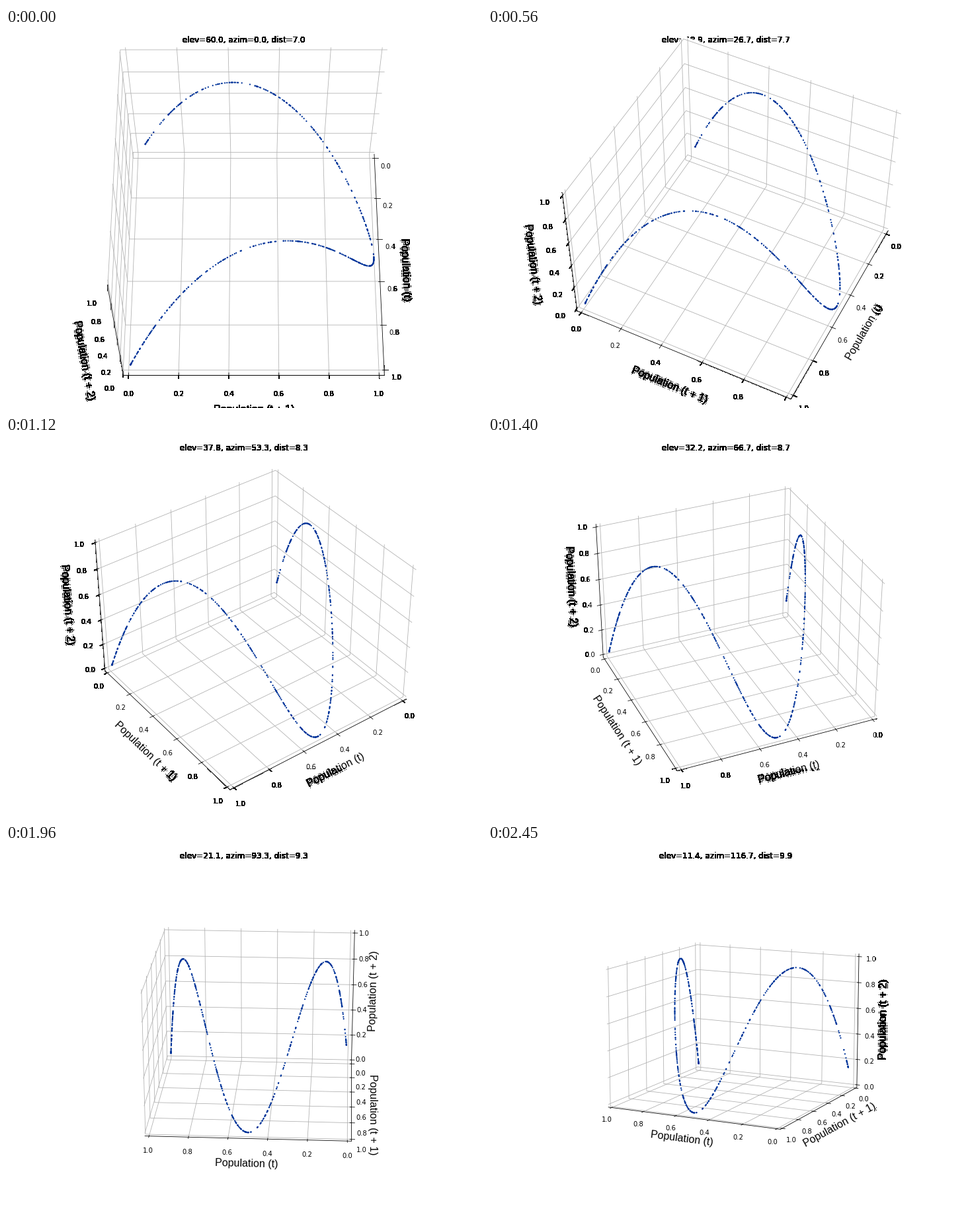
Write a matplotlib script that moves like this. It is 720 px wide and 576 px high and loops after 2520 ms.

```python
import numpy as np
import matplotlib.pyplot as plt
from matplotlib.animation import FuncAnimation
from matplotlib.collections import LineCollection
from matplotlib.patches import Polygon, Rectangle

W, H = 720, 576
FRAMES, INTERVAL = 36, 70

# Square plot area in pixels, and the camera's scale and centre inside it
SIDE, BOTTOM = 434.88, 72
LEFT = 369 - SIDE / 2
SCALE = SIDE / 0.185
CENTRE = np.array([LEFT, BOTTOM]) + 0.095 * SCALE
ASPECT = np.array([4, 4, 3]) * 1.8294640721620434 / np.sqrt(41)

LOW, HIGH = -1 / 48, 1 + 1 / 48
DELTA = 1 / 12
PER_POINT = 48 / (2 * SIDE) * DELTA
TICK_PAD, LABEL_PAD = 11.5 * PER_POINT, 25 * PER_POINT
TICKS = np.linspace(0, 1, 6)
NAMES = ["Population (t)", "Population (t + 1)", "Population (t + 2)"]
SIDEWAYS = [1, 0, 0]  # direction of the ticks on each axis


def logistic_points(count=500, rate=3.99):
    pops = [0.5]
    for _ in range(count - 1):
        pops.append(pops[-1] * rate * (1 - pops[-1]))
    pops = np.array(pops)
    points = np.column_stack([pops[:-2], pops[1:-1], pops[2:]])
    x = points[:, 0]
    gaps = ((x > 0.263) & (x < 0.2705)) | ((x > 0.341) & (x < 0.3515))
    return points[~gaps]


class Camera:
    def __init__(self, elev, azim, dist):
        e, a = np.radians([elev, azim])
        self.dist = dist
        self.toward = np.array([np.cos(e) * np.cos(a), np.cos(e) * np.sin(a), np.sin(e)])
        right = [-np.sin(a), np.cos(a), 0]
        up = [-np.sin(e) * np.cos(a), -np.sin(e) * np.sin(a), np.cos(e)]
        self.screen = np.array([right, up]).T
        high = self.toward < -1e-9
        self.far = np.where(high, HIGH, LOW)
        self.near = np.where(high, LOW, HIGH)

    def project(self, points):
        p = (np.asarray(points) - 0.5) * ASPECT
        depth = self.dist - p @ self.toward
        return CENTRE + SCALE * (p @ self.screen) / depth[..., None]


def replaced(point, index, value):
    point = np.array(point, dtype=float)
    point[index] = value
    return point


def pushed_out(point, index, amount):
    """Move a point away from the cube's centre, except along one axis."""
    step = np.where(point < 0.5, -amount, amount)
    return point + replaced(step, index, 0)


def axis_parts(cam, i):
    """Screen positions of one axis: line, ticks, tick labels, label, grid, pane."""
    j = SIDEWAYS[i]
    start = replaced(cam.far, j, cam.near[j])
    end = replaced(start, i, cam.near[i])
    line = cam.project([start, end])
    sign = 1 if cam.far[j] > 0.5 else -1

    ticks, spots, grid = [], [], []
    for t in TICKS:
        at = replaced(start, i, t)
        ticks.append(cam.project([replaced(at, j, at[j] + 0.1 * sign * DELTA),
                                  replaced(at, j, at[j] - 0.2 * sign * DELTA)]))
        spots.append(cam.project(pushed_out(at, i, TICK_PAD)))
        back = replaced(cam.far, i, t)
        a, b = (i + 1) % 3, (i + 2) % 3
        grid.append(cam.project([replaced(back, a, cam.near[a]), back,
                                 replaced(back, b, cam.near[b])]))

    dx, dy = line[1] - line[0]
    angle = np.degrees(np.arctan2(dy, dx)) % 180
    if angle > 90:
        angle -= 180
    label = cam.project(pushed_out((start + end) / 2, i, LABEL_PAD))

    a, b = (i + 1) % 3, (i + 2) % 3
    corners = [replaced(replaced(cam.far, a, p), b, q)
               for p, q in [(LOW, LOW), (LOW, HIGH), (HIGH, HIGH), (HIGH, LOW)]]
    return line, ticks, spots, label, angle, grid, cam.project(corners)


def harden(img, dpi):
    """Turn every touched pixel solid black."""
    out = np.zeros_like(img)
    out[..., 3] = img[..., 3] > 0
    return out, 0, 0


class Ink:
    """The black lines and texts of the plot on one layer."""

    def __init__(self, ax):
        self.lines = LineCollection([], colors="black", linewidths=0.8,
                                    capstyle="projecting", zorder=3)
        ax.add_collection(self.lines, autolim=False)
        self.numbers = [[ax.text(0, 0, f"{t:.1f}", family="DejaVu Sans", size=10,
                                 ha="center", va="top", zorder=4) for t in TICKS]
                        for _ in NAMES]
        self.labels = [ax.text(0, 0, name, family="Liberation Sans", size=16,
                               ha="center", va="center", zorder=4) for name in NAMES]

    def update(self, parts):
        segments = []
        for i, (line, ticks, spots, label, angle, _, _) in enumerate(parts):
            segments += [line, *ticks]
            for text, spot in zip(self.numbers[i], spots):
                text.set_position(spot)
            self.labels[i].set_position(label)
            self.labels[i].set_rotation(angle)
        self.lines.set_segments(segments)


def layer(fig, zorder):
    ax = fig.add_axes([0, 0, 1, 1], zorder=zorder)
    ax.set_xlim(0, W)
    ax.set_ylim(0, H)
    ax.set_axis_off()
    return ax


fig = plt.figure(figsize=(10, 8), dpi=72, facecolor="white")
back, front = layer(fig, 0), layer(fig, 1)

# Text is hard-edged outside the plot area and smooth on its white ground
back.set_agg_filter(harden)
inks = [Ink(back), Ink(front)]
title = back.text(W / 2, 0.98 * H, "", family="DejaVu Sans", size=12,
                  ha="center", va="top")

front.add_patch(Rectangle((LEFT, BOTTOM), SIDE, SIDE, fc="white", ec="none", zorder=0))
panes = [front.add_patch(Polygon([(0, 0), (1, 0), (1, 1)], fc="white", ec="white",
                                 lw=1, zorder=1)) for _ in NAMES]
grid = LineCollection([], colors="#b0b0b0", linewidths=0.8, zorder=2)
front.add_collection(grid, autolim=False)
points = logistic_points()
dots = front.scatter(points[:, 0], points[:, 1], s=5, c="#003399",
                     edgecolors="none", zorder=5)


def draw(frame):
    turn = frame / FRAMES
    elev, azim, dist = 60 - 50 * turn, 120 * turn, 7 + 3 * turn
    cam = Camera(elev, azim, dist)
    parts = [axis_parts(cam, i) for i in range(3)]
    for ink in inks:
        ink.update(parts)
    for pane, part in zip(panes, parts):
        pane.set_xy(part[6])
    grid.set_segments([seg for part in parts for seg in part[5]])
    dots.set_offsets(cam.project(points))
    title.set_text(f"elev={elev:.1f}, azim={azim:.1f}, dist={dist:.1f}")
    return []


anim = FuncAnimation(fig, draw, frames=FRAMES, interval=INTERVAL, repeat=True)
plt.show()
```
